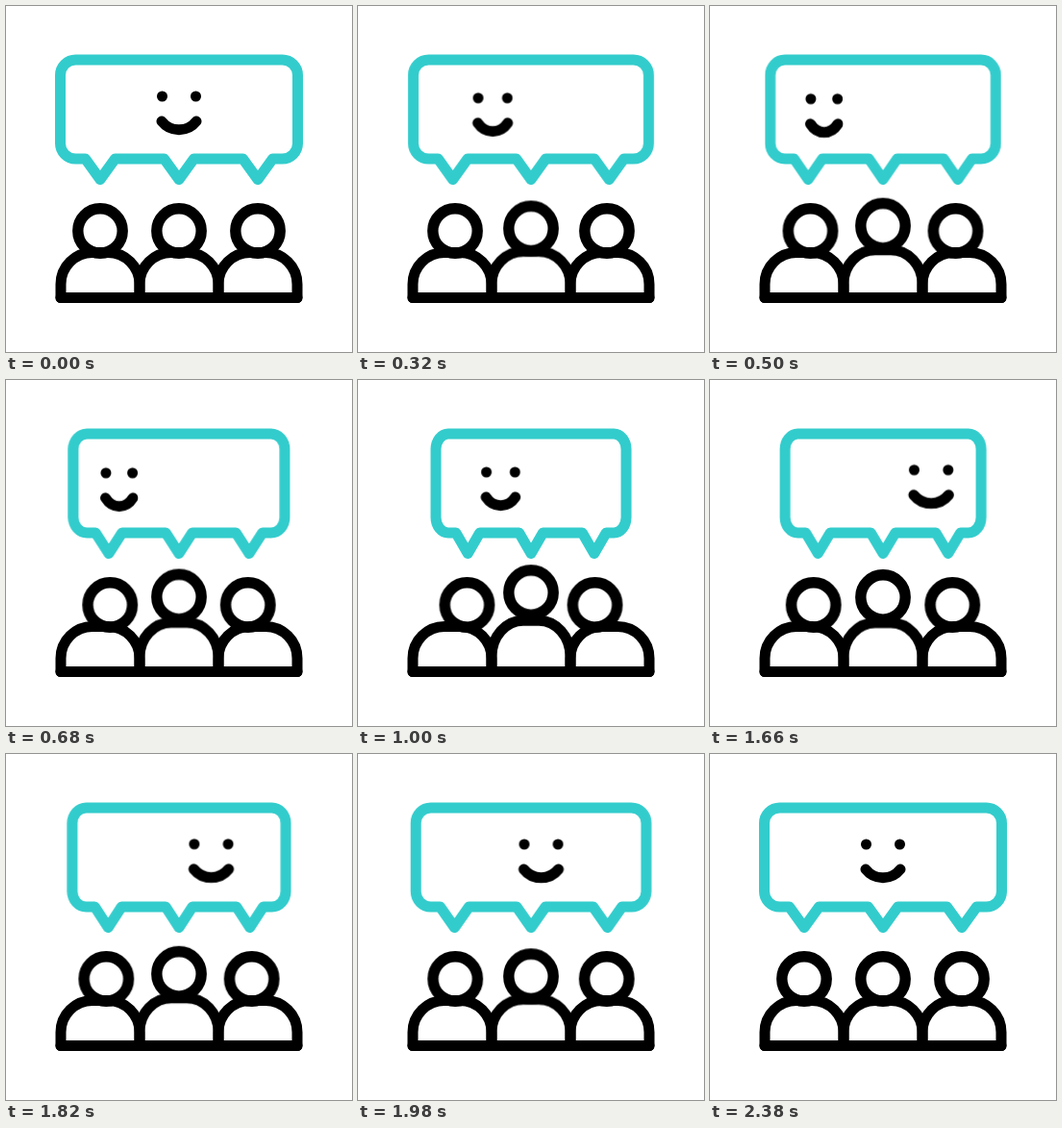
An HTML page that plays this animation: 360x360 px, repeating every 2400 ms.

```html
<!DOCTYPE html>
<html lang="en">
<head>
<meta charset="utf-8">
<title>Happy audience</title>
<style>
  html, body { margin: 0; width: 100%; height: 100%; overflow: hidden; background: #fff; }
  svg { display: block; width: 360px; height: 360px; }
  svg * { vector-effect: non-scaling-stroke; }
  g, path, circle {
    fill: none;
    stroke-width: 11px;
    stroke-linecap: round;
    stroke-linejoin: round;
  }
  .ink { stroke: #000; }
  .bubble { stroke: #3cc; transform-origin: 180px 0; }

  .bubble, .face, .head, .rise {
    animation: 2400ms cubic-bezier(.333, 0, .667, 1) infinite;
  }
  .bubble { animation-name: squeeze; }
  .face { animation-name: look; }
  .head { animation-name: lean; stroke-width: 11.4px; }
  .left { --dx: 16.3px; --dy: 0px; }
  .mid { --dx: 0px; --dy: -13.5px; }
  .right { --dx: -16.3px; --dy: 0px; }
  .rise { animation-name: grow; transform-origin: 180px 303.5px; }

  @keyframes squeeze {
    0%, 8.75% { transform: scaleX(1); }
    46.67%, 62.5% { transform: scaleX(.792); }
    88.75%, 100% { transform: scaleX(1); }
  }
  @keyframes look {
    0% { transform: translate(180px, 0) scaleX(1); }
    22.5%, 29.17% { transform: translate(117.8px, 2.7px) scaleX(.79); }
    65.83%, 67.5% { transform: translate(231px, -.4px) scaleX(1.01); }
    88.75%, 100% { transform: translate(180px, 0) scaleX(1); }
  }
  @keyframes lean {
    0% { transform: translate(0, 0); }
    48.33% { transform: translate(var(--dx), var(--dy)); }
    96.25%, 100% { transform: translate(0, 0); }
  }
  @keyframes grow {
    0% { transform: scaleY(1); }
    48.33% { transform: scaleY(1.14); }
    96.25%, 100% { transform: scaleY(1); }
  }
</style>
</head>
<body>
<svg viewBox="0 0 360 360">
  <path class="bubble" d="M72.5 56H287.5a16 16 0 0 1 16 16V143a16 16 0 0 1-16 16H277.5l-15.5 21.5-15.5-21.5H195.5l-15.5 21.5-15.5-21.5H113.5l-15.5 21.5-15.5-21.5H72.5a16 16 0 0 1-16-16V72a16 16 0 0 1 16-16Z"/>

  <g class="face ink">
    <path d="M-17.5 94h.01M17.5 94h.01"/>
    <path d="M-18 120C-9 131.6 9 131.6 18 120"/>
  </g>

  <g class="ink">
    <path d="M57 303.5H303"/>
    <path d="M57 303.5V289.5a33 33 0 0 1 33-33h16a33 33 0 0 1 33 33v14"/>
    <path class="rise" d="M139 300V289.5a33 33 0 0 1 33-33h16a33 33 0 0 1 33 33V300"/>
    <path d="M221 303.5V289.5a33 33 0 0 1 33-33h16a33 33 0 0 1 33 33v14"/>
    <circle class="head left" cx="98" cy="234" r="23.2"/>
    <circle class="head mid" cx="180" cy="234" r="23.2"/>
    <circle class="head right" cx="262" cy="234" r="23.2"/>
  </g>
</svg>
</body>
</html>
```
